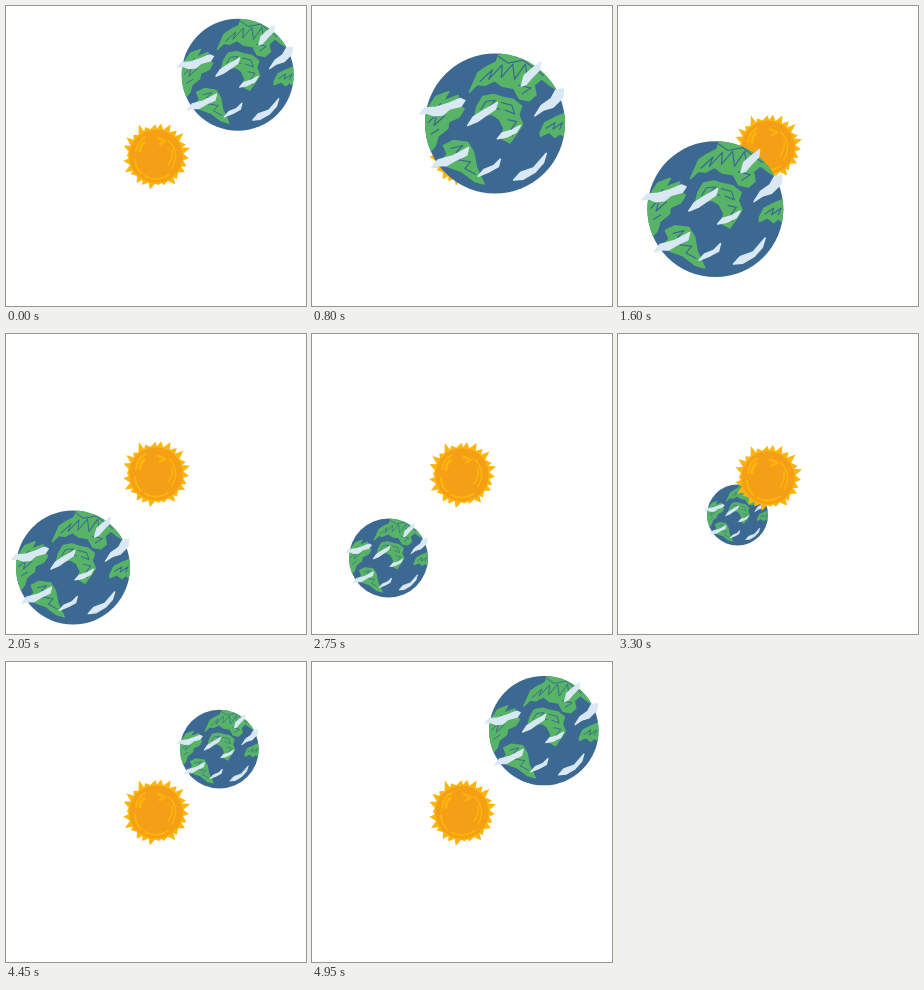
Animation of 300 by 300 pixels, one loop 5000 ms. Source, as an HTML page:

```html
<!DOCTYPE html>
<html lang="en">
<head>
<meta charset="utf-8">
<title>Earth and sun</title>
<style>
  html, body { margin: 0; width: 100%; height: 100%; overflow: hidden; background: #fff; }
  svg { display: block; width: 100vw; height: 100vh; }
  .land { fill: #57b467; stroke: #57b467; stroke-width: 2; stroke-linejoin: round; }
  .sketch { fill: none; stroke: #3c6992; stroke-width: 1.3; stroke-linecap: round; stroke-linejoin: round; }
  .cloud { fill: #d9e8f3; stroke: #d9e8f3; stroke-width: 1.6; stroke-linejoin: round; }
  .glow { fill: none; stroke: #fdb50c; stroke-width: 2; stroke-linecap: round; }
</style>
</head>
<body>
<svg id="stage" viewBox="0 0 300 300">
  <clipPath id="globe"><circle cx="139.5" cy="161" r="73"/></clipPath>
  <g id="sun">
    <path id="rays" fill="#fdb50c"/>
    <circle r="26.5" fill="#f59f17"/>
    <g class="glow">
      <path d="M-20-5C-19-13-16-17-11-19M-21 3C-21 9-18 14-15 17"/>
      <path d="M-16-5C-16-9-14-12-12-14" stroke-width="3"/>
      <path d="M2-18L9-15L4-12" stroke-width="2.4"/>
      <path d="M13-15C21-7 21 3 16 12M12 9C16 4 17-1 16-6" stroke-width="1.5"/>
      <path d="M-11 20C-4 24 4 24 12 19"/>
    </g>
  </g>
  <g id="earth">
    <g transform="translate(-139.5 -161)">
      <circle cx="139.5" cy="161" r="73" fill="#3c6992"/>
      <g clip-path="url(#globe)">
        <g class="land">
          <path d="M113 128L118 117L122 108L131 102L141 97L145 86L165 90L187 100L203 118L205 126L197 121L188 114L180 121L182 131L175 137L165 135L159 124L147 122L139 116L129 121L121 120Z"/>
          <path d="M118 156L121 143L127 133L138 131L148 134L158 136L167 143L164 152L168 162L162 171L155 181L146 176L149 166L144 156L136 151L127 153Z"/>
          <path d="M64 158L70 145L78 133L91 128L85 138L101 132L98 139L107 146L102 154L91 159L90 166L80 174L77 184L71 191L64 176Z"/>
          <path d="M86 184L96 179L111 181L117 191L120 207L128 224L118 221L105 211L91 206L84 200L90 193Z"/>
          <path d="M187 170L192 160L202 155L214 150L214 176L207 171L202 175L196 170L187 174Z"/>
        </g>
        <g class="sketch">
          <path d="M124 117L137 105L133 115L147 100L146 113L158 99L160 115L171 99L173 112M143 91L153 98L169 95L190 111M164 121L177 124L168 130"/>
          <path d="M125 146L130 138L140 137L132 145L144 146M146 139L157 142L160 151L150 147M153 157L162 159L155 169L158 174"/>
          <path d="M70 160L79 151L76 163L87 153M83 140L76 148L94 144M73 172L81 167"/>
          <path d="M94 187L106 184L99 191L110 191L101 199L114 201L108 208L119 214"/>
          <path d="M193 166L202 160L200 167L210 160L207 167"/>
        </g>
      </g>
      <g class="cloud">
        <path d="M61 151L66 145L78 144L91 140L103 135L108 137L104 143L92 146L85 152L76 153L68 150Z"/>
        <path d="M111 163L117 154L128 147L142 139L140 146L131 152L121 159Z"/>
        <path d="M142 177L147 171L157 168L166 163L162 170L152 175Z"/>
        <path d="M167 122L170 111L178 104L187 97L186 105L178 113L172 120Z"/>
        <path d="M181 153L188 142L198 135L203 126L211 125L210 134L200 144L190 147Z"/>
        <path d="M74 207L80 199L95 195L112 186L110 194L99 199L89 205L80 205Z"/>
        <path d="M122 216L128 209L138 205L145 198L143 206L134 211Z"/>
        <path d="M159 220L166 212L180 207L193 192L190 202L181 212L169 219Z"/>
      </g>
    </g>
  </g>
</svg>
<script>
const LOOP = 5000, STEP = 50;
const stage = document.getElementById('stage');
const sun = document.getElementById('sun');
const earth = document.getElementById('earth');

// Orbit: time, offset along the diagonal, globe radius
const orbit = [
  [0, 81.7, 56], [550, 55, 66.4], [800, 33, 70], [1200, -10.5, 73],
  [1650, -57, 67], [2050, -83, 57], [2750, -73.5, 39.5],
  [3300, -30.5, 30.5], [3950, 27, 27.5], [4400, 60.5, 38]
];

// Ray lengths, clockwise from the right
const rays = [33, 32, 33, 31, 34, 30, 29, 34, 32, 33, 31, 35, 33,
              29, 34, 35, 31, 36, 31, 32, 33, 35, 33, 36, 32, 35];

function drawRays() {
  const turn = 2 * Math.PI / rays.length;
  const point = (a, r) => `${(r * Math.cos(a)).toFixed(1)} ${(r * Math.sin(a)).toFixed(1)}`;
  const d = rays.map((r, i) => {
    const a = (i + 0.25 + 0.22 * Math.sin(i * 2.7)) * turn;
    return `${point((i - 0.35) * turn, 27.5)}L${point(a, r)}`;
  });
  document.getElementById('rays').setAttribute('d', `M${d.join('L')}Z`);
}

function knot(i) {
  const n = orbit.length, wrap = Math.floor(i / n);
  const [t, d, r] = orbit[i - wrap * n];
  return [t + wrap * LOOP, d, r];
}

// Periodic cubic through the orbit points
function sample(t, k) {
  let i = orbit.length - 1;
  while (orbit[i][0] > t) i--;
  const slope = j => {
    const a = knot(j - 1), b = knot(j), c = knot(j + 1);
    const h = b[0] - a[0], g = c[0] - b[0];
    return (g * (b[k] - a[k]) / h + h * (c[k] - b[k]) / g) / (h + g);
  };
  const p = knot(i), q = knot(i + 1), span = q[0] - p[0];
  const u = (t - p[0]) / span, v = 1 - u;
  return v * v * (1 + 2 * u) * p[k] + u * u * (3 - 2 * u) * q[k]
    + span * u * v * (v * slope(i) - u * slope(i + 1));
}

function render(t) {
  const d = sample(t, 1), r = sample(t, 2);
  const bob = 145 + 5.4 * Math.cos(2 * Math.PI * (t + 250) / LOOP);
  earth.setAttribute('transform', `translate(${150 + d} ${150.5 - d}) scale(${r / 73})`);
  sun.setAttribute('transform', `translate(150 ${bob})`);
  const front = t < 2400 ? earth : sun;
  if (stage.lastElementChild !== front) stage.append(front);
}

const start = performance.now();
function tick() {
  const t = (performance.now() - start) % LOOP;
  render(Math.floor(t / STEP) * STEP);
  requestAnimationFrame(tick);
}

drawRays();
render(0);
requestAnimationFrame(tick);
</script>
</body>
</html>
```
